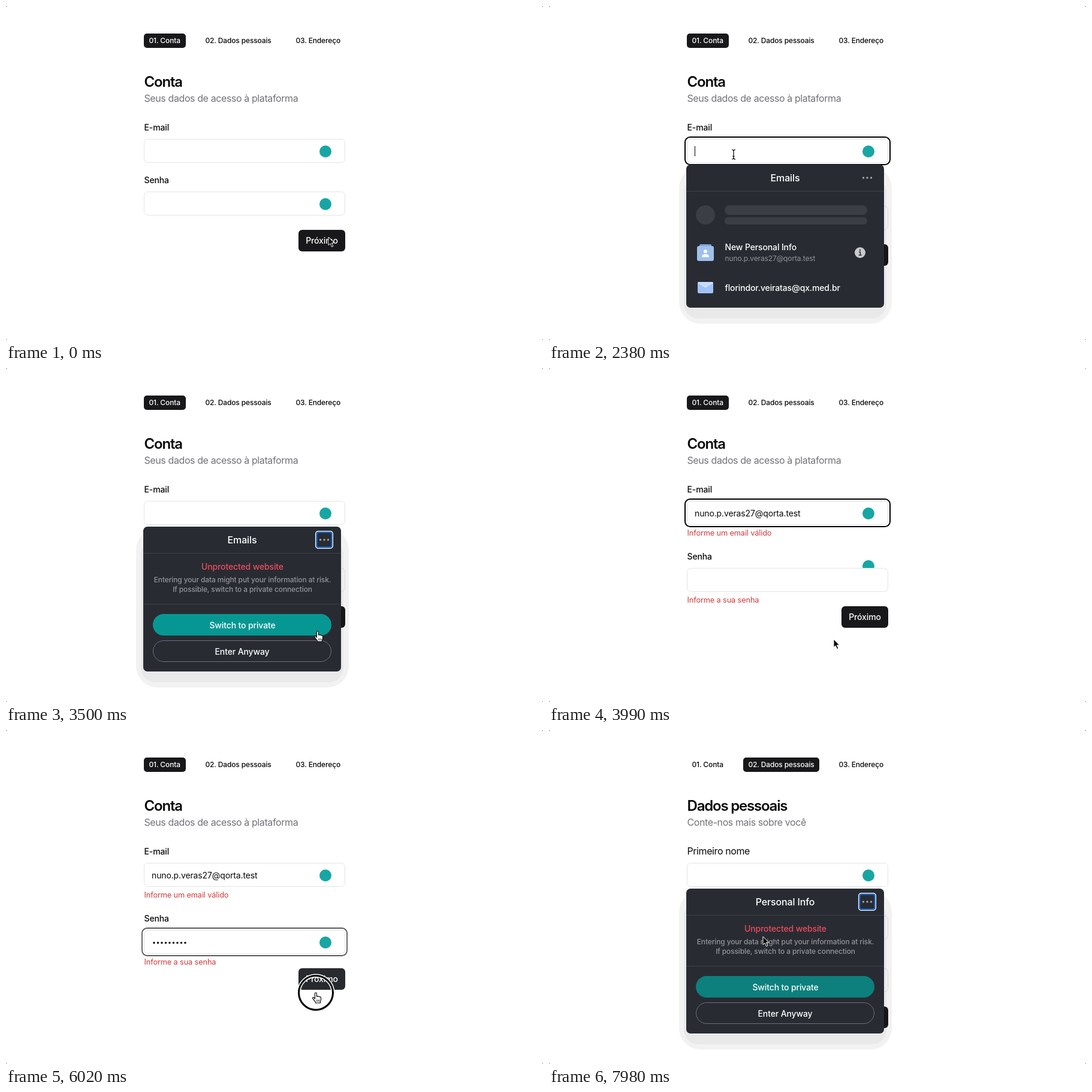
An HTML page that plays this animation: 896 by 558 pixels, repeating every 8 s.

```html
<!DOCTYPE html>
<html lang="pt">
<head>
<meta charset="utf-8">
<title>Cadastro</title>
<style>
html, body { margin: 0; width: 100%; height: 100%; overflow: hidden; background: #555; }
svg { display: block; width: 896px; height: 558px; font-family: Inter, "Open Sans", sans-serif; letter-spacing: -.008em; }
.mono { font-family: "Noto Sans Mono", "DejaVu Sans Mono", monospace; letter-spacing: 0; }
</style>
</head>
<body>
<svg id="stage" viewBox="0 0 896 558"></svg>
<script>
const LOOP = 8000, STEP = 70;
const INK = '#18181b', TEXT = '#09090b', LINE = '#e4e4e7', TEAL = '#17a6a4';
const PANEL = '#282c32', RULE = '#3f4349', MUTED = '#92959a';
const EMAIL = 'nuno.p.veras27@qorta.test';
const stage = document.getElementById('stage');

const text = (x, y, size, str, fill = TEXT, weight = 400, extra = '') =>
  `<text x="${x}" y="${y}" font-size="${size}" fill="${fill}" font-weight="${weight}" ${extra}>${str}</text>`;
const mid = (x, y, size, str, fill = '#fff', weight = 500) =>
  text(x, y, size, str, fill, weight, 'text-anchor="middle"');
const rect = (x, y, w, h, rx, fill, extra = '') =>
  `<rect x="${x}" y="${y}" width="${w}" height="${h}" rx="${rx}" fill="${fill}" ${extra}/>`;
const circle = (x, y, r, fill, extra = '') =>
  `<circle cx="${x}" cy="${y}" r="${r}" fill="${fill}" ${extra}/>`;
const path = (d, fill, extra = '') => `<path d="${d}" fill="${fill}" ${extra}/>`;
const stroke = (color, width = 1) => `stroke="${color}" stroke-width="${width}"`;
const track = em => `letter-spacing="${em}em"`;
const within = (t, a, b) => t >= a && t < b;

// Pointer: time, x, y, shape from that time on
const KEYS = [
  [0, 538, 386, 'arrow'], [150, 538, 386, 'hand'], [630, 525, 397, 'hand'], [770, 524, 397, 'hand'],
  [1120, 524, 397, 'arrow'], [1400, 513, 390, 'arrow'], [1890, 400, 292, 'arrow'],
  [2030, 320, 250, 'beam'], [2380, 308, 248, 'beam'], [2450, 308, 248, 'arrow'],
  [2870, 460, 408, 'hand'], [3000, 460, 408, 'arrow'], [3500, 520, 440, 'hand'],
  [3710, 500, 470, 'hand'], [3850, 500, 470, 'arrow'], [4410, 340, 362, 'beam'],
  [4480, 336, 359, 'beam'], [5180, 336, 359, 'arrow'], [5600, 517, 439, 'hand'],
  [6160, 517, 439, 'arrow'], [6300, 517, 439, 'arrow'], [6580, 480, 388, 'arrow'],
  [7000, 340, 250, 'beam'], [7490, 340, 250, 'arrow'], [7980, 357, 345, 'arrow']
];
const CLICKS = [[1120, 1260], [2030, 2170], [2870, 2980], [3780, 3850], [4480, 4550], [5950, 6160], [7140, 7280]];

const SHAPES = {
  arrow: path('M0 0V13.6L3.1 10.8 5.6 16.4 7.9 15.4 5.4 9.9H9.6Z', '#000', stroke('#fff') + ' stroke-linejoin="round"'),
  hand: path('M-1.6 1.2a1.5 1.5 0 0 1 3 0V6q1.4-1 2.6.3 1.6-.7 2.4.6 2-.5 2.1 1.5V11q0 2-1 3.6V17H-.6V15.4Q-3 13-5.2 9.4c-.7-1.5 1-2.4 2.2-1.1l1.4 1.6Z', '#fff', stroke('#000', 1.1)) +
    path('M1.6 11.5V15M3.7 11.5V15M5.8 11.5V15', 'none', stroke('#000', .8)),
  beam: path('M-3-8q3 0 3 2.4 0-2.4 3-2.4M0-6V6M-3 8q3 0 3-2.4Q0 8 3 8M-1.6 3.2h3.2', 'none', stroke('#000', 1.2))
};

function pointerAt(t) {
  let i = KEYS.length - 1;
  while (KEYS[i][0] > t) i--;
  const a = KEYS[i], b = KEYS[i + 1] || a;
  const p = b === a ? 0 : (t - a[0]) / (b[0] - a[0]);
  const e = p * p * (3 - 2 * p);
  return { x: a[1] + (b[1] - a[1]) * e, y: a[2] + (b[2] - a[2]) * e, shape: a[3] };
}

function pointer(t) {
  const { x, y, shape } = pointerAt(t);
  const ring = CLICKS.some(c => within(t, ...c))
    ? circle(x, y, 28.5, 'none', stroke('#fff', 6)) + circle(x, y, 28.5, 'none', stroke('#000', 3)) : '';
  return `${ring}<g transform="translate(${x} ${y})">${SHAPES[shape]}</g>`;
}

const input = y => rect(230.5, y + .5, 335, 39, 6, '#fff', stroke(LINE));
const focusRing = (y, width = 2, alpha = 1) =>
  rect(227, y - 3, 342, 46, 8.5, 'none', `${stroke('#000', width)} opacity="${alpha}"`);
const caret = y => rect(243, y + 12, 1, 17, 0, '#000');
const badge = y => circle(533, y + 21, 10, TEAL);
const label = (y, str) => text(230.5, y, 14, str, TEXT, 500);
const error = (y, str) => text(230.5, y, 12.8, str, '#d03b3e', 400, track(-.012));
const button = (y, hover) => rect(488, y, 78, 36, 6, hover ? '#282a2f' : INK) + mid(527, y + 23, 14, 'Próximo');

function tabs(active) {
  const items = [['01. Conta', 230, 70], ['02. Dados pessoais', 324, 127], ['03. Endereço', 475, 92]];
  return items.map(([str, x, w], i) => {
    const on = i + 1 === active;
    return (on ? rect(x, 46, w, 24, 5, INK) : '') + text(x + 8.5, 62, 12, str, on ? '#fff' : TEXT, 500, track(-.012));
  }).join('');
}
const heading = (title, sub) =>
  text(230.5, 135, 24, title, TEXT, 600, track(-.05)) + text(230.5, 160, 16, sub, '#71717a', 400, track(-.025));

function account(t) {
  const bad = t >= 1120, dy = bad ? 24 : 0, pass = 310 + dy;
  const onEmail = within(t, 2030, 2980) || within(t, 3850, 4480);
  const filled = t >= 3850;
  const moved = t >= 4480;
  let s = heading('Conta', 'Seus dados de acesso à plataforma');
  s += label(208, 'E-mail') + input(222) + badge(222);
  if (filled) s += text(243, 248, 14, EMAIL);
  else if (onEmail) s += caret(222);
  if (onEmail) s += focusRing(222);
  if (bad) s += error(280, 'Informe um email válido') + error(392, 'Informe a sua senha');
  s += label(296 + dy, 'Senha');
  // the badge lags behind the shifted field, half hidden by it
  s += moved ? input(pass) + badge(pass) : bad ? badge(310) + input(pass) : input(pass) + badge(pass);
  if (within(t, 4480, 5950)) s += focusRing(pass);
  else if (within(t, 5950, 6160)) s += focusRing(pass, 1.8, .65);
  if (within(t, 4480, 4830)) s += caret(pass);
  const typed = t < 4830 ? 0 : Math.min(9, 2 + Math.floor((t - 4830) / 100));
  for (let i = 0; i < typed; i++) s += circle(247 + 6.5 * i, pass + 21.5, 1.7, TEXT);
  return s + button(374 + dy, within(t, 150, 1120) || t >= 5530);
}

function personal(t) {
  let s = heading('Dados pessoais', 'Conte-nos mais sobre você');
  ['Primeiro nome', 'Sobrenome', 'CPF'].forEach((str, i) => {
    s += text(230.5, 208 + 88 * i, 16, str, TEXT, 400, track(-.025)) + input(222 + 88 * i);
  });
  s += badge(222);
  if (within(t, 7140, 7490)) s += focusRing(222) + caret(222);
  return s + button(462);
}

function panel(y, h, title, marked) {
  let s = rect(217, y + 3, 355, h + 24, 36, '#000', 'opacity=".05"') +
    rect(225, y + 22, 338, h - 4, 24, '#000', 'opacity=".04"') +
    rect(229, y, 330, h, 7, PANEL) + rect(229, y + 44, 330, 1, 0, RULE) + mid(394, y + 28, 16, title);
  if (marked) s += rect(516.75, y + 7.75, 28.5, 28.5, 4, 'none', stroke('#fff', 1.5)) +
    rect(518.5, y + 9.5, 25, 25, 3, 'none', stroke('#1768d8', 2));
  for (let i = 0; i < 3; i++) s += circle(524.5 + 6.5 * i, y + 22, 1.7, '#a0a2a6');
  return s;
}

function emailList() {
  const dim = '#3b3e45', blue = '#9fc0ea';
  return panel(265, 239, 'Emails') +
    circle(261, 349, 16, dim) + rect(293, 333, 238, 16, 8, dim) + rect(293, 353, 238, 12, 6, dim) +
    rect(251, 398, 20, 6, 2, '#7ea4d8') + rect(247, 401, 28, 25, 3, blue) +
    circle(261, 410, 3, '#fff') + path('M255 419.5q0-5 6-5t6 5Z', '#fff') +
    text(293.5, 408, 14, 'New Personal Info', '#fff', 500) + text(293.5, 426, 12, EMAIL, MUTED) +
    circle(519, 412, 9, '#c9cacc') +
    path('M517 411h2.4v5M516.8 416.2h4.8', 'none', stroke(PANEL, 1.5)) + circle(518.9, 407.7, 1.2, PANEL) +
    rect(248, 461, 26, 19, 2.5, '#a0c2f8') + path('M248 463q0-2 2-2h22q2 0 2 2l-13 8Z', '#c8dcfa') +
    text(293.5, 476, 14, 'florindor.veiratas@qx.med.br', '#fff', 500);
}

function risk(title, hover) {
  return panel(265, 242, title, true) +
    mid(394.5, 337, 14, 'Unprotected website', '#ee4a5f') +
    mid(394.5, 358, 12, 'Entering your data might put your information at risk.', MUTED) +
    mid(394.5, 374, 12, 'If possible, switch to a private connection', MUTED) +
    rect(229, 394, 330, 1, 0, RULE) +
    rect(245, 411, 298, 36, 18, hover ? '#079793' : '#0d807d') + mid(394.5, 435, 14, 'Switch to private') +
    rect(245.5, 455.5, 297, 35, 17.5, 'none', stroke('#6d7075')) + mid(394, 479, 14, 'Enter Anyway');
}

function generator() {
  const word = 'L$$ghX4d9$2JEV9debkk'.replace(/\d/g, d => `<tspan fill="#8f8ae6">${d}</tspan>`);
  let s = panel(377, 250, 'Password Generator') + rect(229, 422, 330, 150, 0, '#141820') +
    rect(229, 421, 330, 2, 0, RULE) + text(246, 464, 22.6, word, '#fff', 700, 'class="mono"');
  for (const x of [487, 527]) s += circle(x, 566, 15, PANEL, stroke('#6d7075'));
  return s;
}

function popup(t) {
  if (within(t, 2170, 2980)) return emailList();
  if (within(t, 2980, 3850)) return risk('Emails', within(t, 3290, 3600));
  if (within(t, 4550, 4830)) return generator();
  return t >= 7490 ? risk('Personal Info', false) : '';
}

function draw(t) {
  const first = t < 6160;
  stage.innerHTML = rect(0, 0, 896, 558, 2.5, '#fff') + tabs(first ? 1 : 2) +
    (first ? account(t) : personal(t)) + popup(t) + pointer(t);
}

let shown = -1;
function tick() {
  const t = Math.floor((performance.now() % LOOP) / STEP) * STEP;
  if (t !== shown) draw(shown = t);
  requestAnimationFrame(tick);
}
tick();
</script>
</body>
</html>
```
